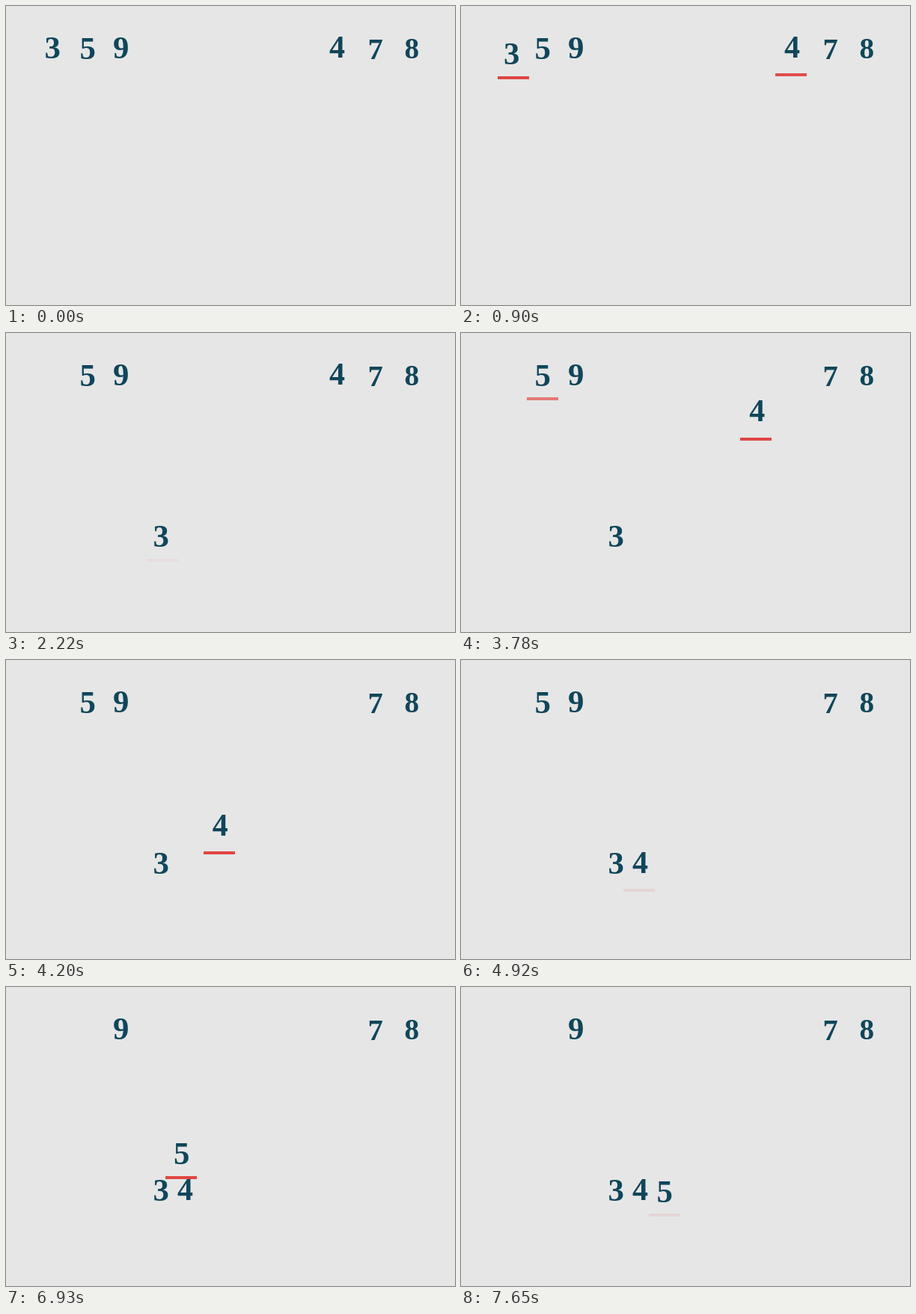
An HTML page with a canvas for the animation above (8000 ms loop, 600 px wide and 400 px high).

```html
<!DOCTYPE html>
<html lang="en">
<head>
<meta charset="utf-8">
<title>Merging two sorted lists</title>
<style>
html, body { margin: 0; width: 100%; height: 100%; overflow: hidden; background: #e6e6e6; }
canvas { display: block; }
</style>
</head>
<body>
<canvas id="stage" width="600" height="400"></canvas>
<script>
const ctx = document.getElementById('stage').getContext('2d');

const LOOP = 8000, TICK = 30;
const ROUND = 2730;               // one comparison and move
const FADE = 570;
const MOVE_AT = 870, MOVE = 780, CLEAR_AT = 1680;

// cx, cy: centre of the digit; h: its height; bx, by: its underline
const digits = {
  3: { cx: 62, cy: 56, h: 29.5, bx: 43, by: 86 },
  5: { cx: 109, cy: 56.5, h: 29.5, bx: 88, by: 86 },
  9: { cx: 153.5, cy: 56, h: 29.5, bx: 132, by: 86 },
  4: { cx: 442.5, cy: 54.5, h: 29, bx: 420, by: 90 },
  7: { cx: 494.5, cy: 58, h: 28, bx: 473, by: 90 },
  8: { cx: 542.5, cy: 56.5, h: 27, bx: 521, by: 90 }
};

const rounds = [
  { pick: 3, other: 4, dx: 145, dy: 216 },
  { pick: 4, other: 5, dx: -203, dy: 216 },
  { pick: 5, other: 7, dx: 163, dy: 217 }
];

const ramp = (t, start, span) => Math.min(1, Math.max(0, (t - start) / span));

function drawDigit(char, d, dx, dy) {
  ctx.fillStyle = '#10465a';
  ctx.font = `bold ${d.h / 0.69}px "Liberation Serif", serif`;
  const m = ctx.measureText(char);
  const x = d.cx + (m.actualBoundingBoxLeft - m.actualBoundingBoxRight) / 2;
  const y = d.cy + (m.actualBoundingBoxAscent - m.actualBoundingBoxDescent) / 2;
  ctx.fillText(char, x + dx, y + dy);
}

function drawBar(d, dx, dy, alpha) {
  ctx.globalAlpha = alpha;
  ctx.fillStyle = '#e04542';
  ctx.fillRect(Math.round(d.bx + dx), Math.round(d.by + dy), 42, 4);
  ctx.globalAlpha = 1;
}

function draw(t) {
  ctx.fillStyle = '#e6e6e6';
  ctx.fillRect(0, 0, 600, 400);

  const shift = {};
  rounds.forEach((r, i) => {
    const local = t - i * ROUND;
    const k = ramp(local, MOVE_AT, MOVE);
    const shown = ramp(local, 0, FADE);
    const [dx, dy] = shift[r.pick] = [r.dx * k, r.dy * k];
    drawBar(digits[r.pick], dx, dy, shown - ramp(local, CLEAR_AT, FADE));
    drawBar(digits[r.other], 0, 0, shown - ramp(local, MOVE_AT, FADE));
  });

  for (const char in digits) {
    const [dx, dy] = shift[char] || [0, 0];
    drawDigit(char, digits[char], dx, dy);
  }
}

const begin = performance.now();

function frame() {
  const t = (performance.now() - begin) % LOOP;
  draw(Math.floor(t / TICK) * TICK);
  requestAnimationFrame(frame);
}
frame();
</script>
</body>
</html>
```
